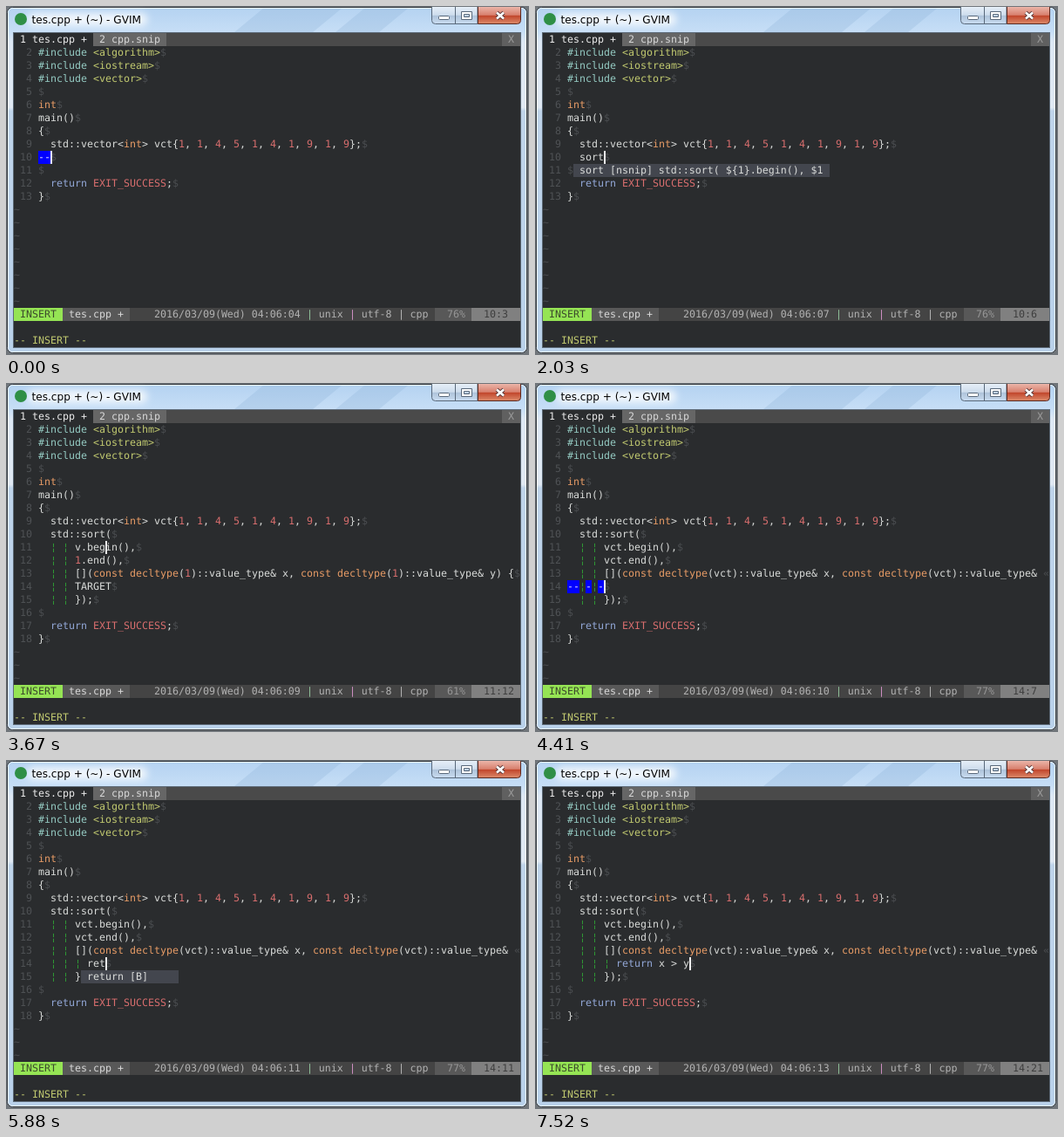
An HTML page that plays this animation: 600 px wide and 400 px high, repeating every 8 s.

```html
<!DOCTYPE html>
<html lang="en">
<head>
<meta charset="utf-8">
<title>Editor snippet demo</title>
<style>
  html, body { margin: 0; width: 100%; height: 100%; overflow: hidden; background: #70757a; }
  svg { display: block; width: 600px; height: 400px; }
  #screen text { font: 11.627px "DejaVu Sans Mono", monospace; white-space: pre; text-rendering: geometricPrecision; }
  .title { font: 12.1px "DejaVu Sans", sans-serif; }
</style>
</head>
<body>
<svg viewBox="0 0 600 400">
  <defs>
    <linearGradient id="frame" x2="0" y2="1">
      <stop offset="0" stop-color="#b4d2f1"/>
      <stop offset=".07" stop-color="#c6def6"/>
      <stop offset=".1" stop-color="#dde8f4"/>
      <stop offset=".29" stop-color="#e0e9f3"/>
      <stop offset=".3" stop-color="#bfd4ea"/>
      <stop offset="1" stop-color="#b9d1ea"/>
    </linearGradient>
    <linearGradient id="glass" x2="0" y2="1">
      <stop offset="0" stop-color="#e6eff8"/>
      <stop offset=".48" stop-color="#cddcec"/>
      <stop offset=".52" stop-color="#aec3da"/>
      <stop offset="1" stop-color="#c9dcf0"/>
    </linearGradient>
    <linearGradient id="close" x2="0" y2="1">
      <stop offset="0" stop-color="#ebb5a9"/>
      <stop offset=".48" stop-color="#d8806e"/>
      <stop offset=".52" stop-color="#c1452b"/>
      <stop offset="1" stop-color="#dc8a6a"/>
    </linearGradient>
    <filter id="soft" x="-20%" y="-60%" width="140%" height="220%"><feGaussianBlur stdDeviation="4"/></filter>
  </defs>
  <rect x="1.5" y="1.5" width="596" height="396" rx="6" fill="url(#frame)" stroke="#30363c"/>
  <path d="M296 2h90l-34 28h-90zM412 2h50l-34 28h-50z" fill="#8fb2d8" fill-opacity=".3"/>
  <rect x="2.5" y="2.5" width="594" height="394" rx="5" fill="none" stroke="#f4fafe" stroke-opacity=".85"/>
  <rect x="24" y="8" width="138" height="15" rx="7" fill="#fff" fill-opacity=".8" filter="url(#soft)"/>
  <circle cx="17" cy="15" r="7" fill="#2f8f46"/>
  <text class="title" x="29.5" y="19.5" fill="#000">tes.cpp + (~) - GVIM</text>
  <g stroke="#59697b">
    <path d="M488.5 1V16.5Q488.5 20.5 492.5 20.5H541V1" fill="url(#glass)"/>
    <path d="M515.5 1V20"/>
    <path d="M541.5 1V20.5H586.5Q590.5 20.5 590.5 16.5V1" fill="url(#close)" stroke="#5a2a22"/>
    <rect x="496.5" y="11.5" width="12" height="4" rx="1" fill="#fff"/>
    <path d="M522.5 6.5h12v9h-12zM525.5 9.5h6v3h-6z" fill="#fff" fill-rule="evenodd"/>
  </g>
  <path d="M563 7.5l8 7m0-7l-8 7" stroke="#5a3a3a" stroke-width="4.4"/>
  <path d="M563 7.5l8 7m0-7l-8 7" stroke="#fff" stroke-width="2.6"/>
  <rect x="8.5" y="30.5" width="582" height="361" fill="#2a2c2e" stroke="#5d6a77"/>
  <g id="screen"></g>
</svg>
<script>
const LOOP = 8000, CELL = 7, ROW = 15, LEFT = 9, TOP = 31, GUTTER = 4, COLS = 83;
const STATUS_ROW = 21, MESSAGE_ROW = 23;
const COLORS = {
  text: '#dadcda', pre: '#95cbc3', str: '#c2ca70', type: '#e89c66', key: '#93a8d8',
  num: '#d86e6e', dim: '#4b4e51', guide: '#2f9a35', trail: '#e8e8ff'
};
const TOKENS = /(?<pre>#include)|(?<str><(?:algorithm|iostream|vector)>)|(?<type>\b(?:int|const|decltype)\b)|(?<key>\breturn\b)|(?<num>\b(?:\d+|EXIT_SUCCESS)\b)|(?<dim>[$«])|(?<guide>¦)|(?<trail>-+)|(?<text>[^#<\w$«¦-]+|\w+|.)/g;

const HEAD = ['#include <algorithm>', '#include <iostream>', '#include <vector>', '', 'int', 'main()', '{',
  '  std::vector<int> vct{1, 1, 4, 5, 1, 4, 1, 9, 1, 9};'];
const TAIL = ['', '  return EXIT_SUCCESS;', '}'];

const typing = word => [...HEAD, '  ' + word, ...TAIL];
const expanded = (first, name, body) => {
  const param = `const decltype(${name})::value_type&`;
  return [...HEAD, '  std::sort(', `      ${first}.begin(),`, `      ${name}.end(),`,
    `      [](${param} x, ${param} y) {`, body, '      });', ...TAIL];
};
const lambda = body => expanded('vct', 'vct', body);
const statement = code => lambda('        ' + code);

const sortMenu = { line: 11, col: 5, width: 42, text: 'sort [nsnip] std::sort( ${1}.begin(), $1' };
const returnMenu = { line: 15, col: 11, width: 16, text: 'return [B]' };

// start time, buffer, ruler, clock second, cursor column, popup menu
const STATES = [
  [0, typing(''), '10:3', 4, 2],
  [1610, typing('s'), '10:4', 7, 3],
  [1760, typing('so'), '10:5', 7, 4, sortMenu],
  [1880, typing('sor'), '10:5', 7, 5, sortMenu],
  [2030, typing('sort'), '10:6', 7, 6, sortMenu],
  [2710, expanded('', '1', '      TARGET'), '11:11', 8, 10],
  [3670, expanded('v', '1', '      TARGET'), '11:12', 9, 11],
  [3820, expanded('vc', '1', '      TARGET'), '11:13', 9, 12],
  [4130, expanded('vct', '1', '      TARGET'), '11:13', 9, 13],
  [4410, lambda('      '), '14:7', 10, 6],
  [5340, lambda('       '), '14:8', 11, 7],
  [5460, statement(''), '14:9', 11, 8],
  [5580, statement('r'), '14:10', 11, 9],
  [5730, statement('re'), '14:11', 11, 10, returnMenu],
  [5880, statement('ret'), '14:11', 11, 11, returnMenu],
  [6000, statement('retu'), '14:12', 11, 12, returnMenu],
  [6120, statement('retur'), '14:13', 11, 13, returnMenu],
  [6270, statement('return'), '14:14', 12, 14, returnMenu],
  [6420, statement('return '), '14:16', 12, 15],
  [6570, statement('return x'), '14:16', 12, null],
  [6720, statement('return x'), '14:17', 12, 16],
  [6840, statement('return x '), '14:18', 12, 17],
  [7120, statement('return x >'), '14:19', 12, 18],
  [7400, statement('return x > '), '14:20', 13, 19],
  [7520, statement('return x > y'), '14:21', 13, 20]
];

const xOf = col => LEFT + col * CELL;
const yOf = row => TOP + row * ROW;
const escapeText = s => s.replace(/&/g, '&amp;').replace(/</g, '&lt;');
const text = (col, row, s, fill) =>
  `<text x="${xOf(col)}" y="${yOf(row) + 11}" fill="${fill}">${escapeText(s)}</text>`;
const block = (col, row, width, fill) =>
  `<rect x="${xOf(col)}" y="${yOf(row)}" width="${width * CELL}" height="${ROW}" fill="${fill}"/>`;
const label = (col, row, s, fg, bg) => block(col, row, s.length, bg) + text(col, row, s, fg);

// Shows indent guides, trailing blanks, the line end and the cut-off mark.
function visible(raw) {
  const indent = raw.match(/^ */)[0].length;
  const cells = [...raw.replace(/ +$/, blanks => '-'.repeat(blanks.length)) + '$'];
  for (let c = 2; c < indent; c += 2) cells[c] = '¦';
  const room = COLS - GUTTER;
  return cells.length > room ? cells.slice(0, room - 1).join('') + '«' : cells.join('');
}

function codeLine(raw, row) {
  let out = text(0, row, String(row + 1).padStart(3), '#4f5255');
  for (const match of visible(raw).matchAll(TOKENS)) {
    const kind = Object.keys(match.groups).find(k => match.groups[k] !== undefined);
    const col = GUTTER + match.index, s = match[0];
    if (kind === 'trail') out += block(col, row, s.length, '#0000ff');
    if (s.trim()) out += text(col, row, s, COLORS[kind]);
  }
  return out;
}

function tabLine() {
  return block(0, 0, COLS, '#4a4a4a') + label(0, 0, ' 1 tes.cpp + ', '#ececec', '#2a2c2e') +
    label(13, 0, ' 2 cpp.snip ', '#d8d8d8', '#666666') + label(80, 0, ' X ', '#9c9c9c', '#606060');
}

function statusLine(ruler, second, total) {
  const [line, col] = ruler.split(':');
  const percent = Math.floor(100 * line / total);
  const time = `2016/03/09(Wed) 04:06:${String(second).padStart(2, '0')}`;
  return block(0, STATUS_ROW, COLS, '#444444') +
    label(0, STATUS_ROW, ' INSERT ', '#3c4a2c', '#95e454') +
    label(8, STATUS_ROW, ' tes.cpp + ', '#d8d8d8', '#585858') +
    text(23, STATUS_ROW, `${time}   unix   utf-8   cpp`, '#b2b2b2') +
    text(48, STATUS_ROW, '|', '#8fbf98') + text(55, STATUS_ROW, '|', '#cf8fc4') +
    text(63, STATUS_ROW, '|', '#b4b4b4') +
    label(69, STATUS_ROW, `  ${percent}% `, '#969696', '#585858') +
    label(75, STATUS_ROW, `  ${line}:${col.padEnd(2)} `, '#3e3e3e', '#808080');
}

function render([, lines, ruler, second, cursor, menu]) {
  let out = tabLine() + lines.map((line, i) => codeLine(line, i + 1)).join('');
  for (let row = lines.length + 1; row < STATUS_ROW; row++) out += text(0, row, '~', COLORS.dim);
  if (menu) {
    out += block(menu.col, menu.line - 1, menu.width, '#43464e') +
      text(menu.col + 1, menu.line - 1, menu.text, COLORS.text);
  }
  if (cursor !== null) {
    out += `<rect x="${xOf(GUTTER + cursor)}" y="${yOf(parseInt(ruler) - 1)}" width="2" height="${ROW}" fill="#f0f0f0"/>`;
  }
  return out + statusLine(ruler, second, lines.length + 1) + text(0, MESSAGE_ROW, '-- INSERT --', COLORS.str);
}

const screenGroup = document.getElementById('screen');
const start = performance.now();
let shown;

function tick() {
  const t = (performance.now() - start) % LOOP;
  const state = STATES.filter(s => s[0] <= t).pop();
  if (state !== shown) screenGroup.innerHTML = render(shown = state);
  requestAnimationFrame(tick);
}
tick();
</script>
</body>
</html>
```
